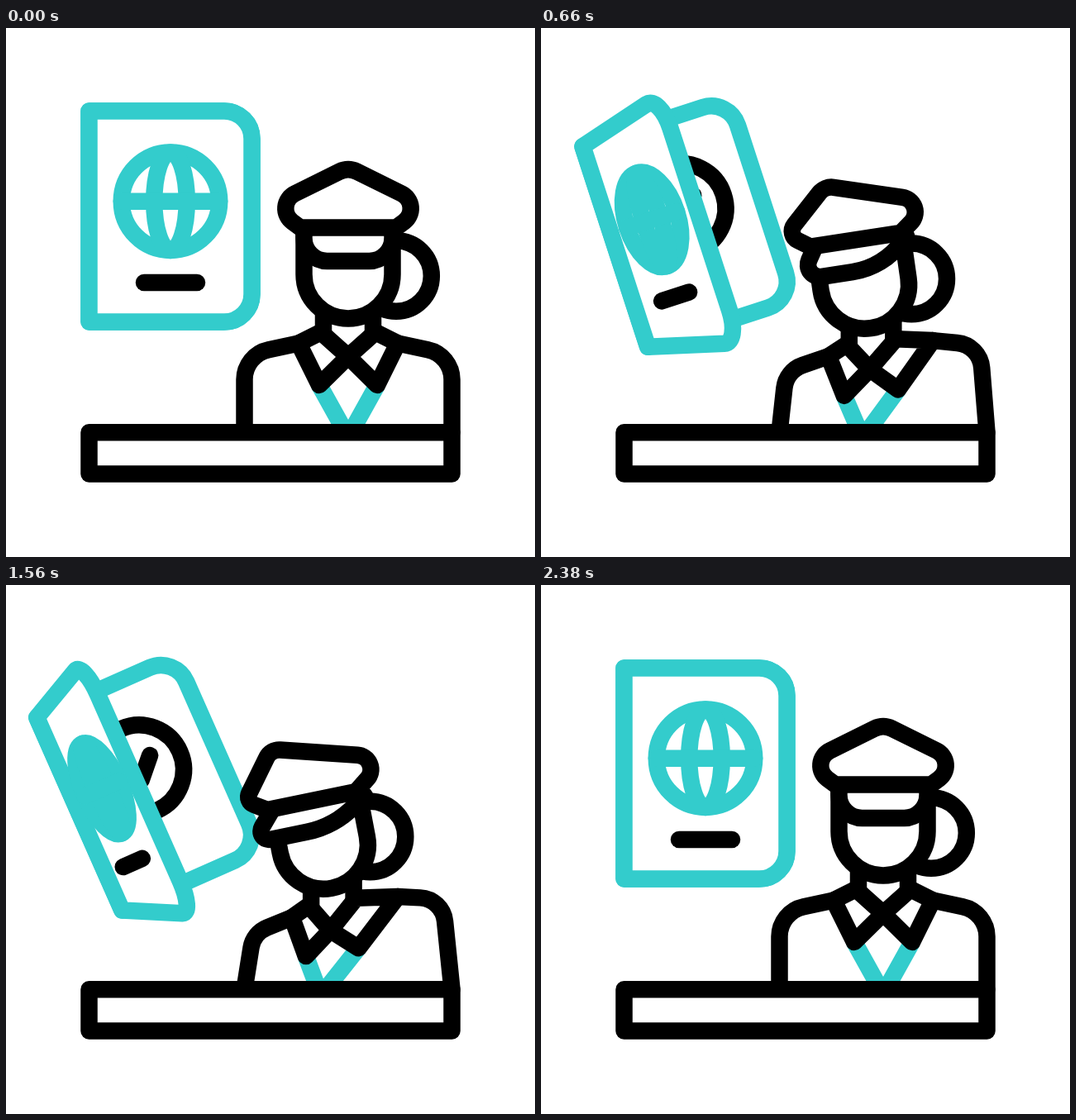
Recreate the animation shown at these times as an HTML page with a canvas. Size 640 by 640 pixels, loop 2400 ms.

```html
<!DOCTYPE html>
<html lang="en">
<head>
<meta charset="utf-8">
<title>Passport control</title>
<style>
  html, body { margin: 0; width: 100%; height: 100%; overflow: hidden; background: #fff; }
  canvas { display: block; width: 640px; height: 640px; }
</style>
</head>
<body>
<canvas id="stage" width="640" height="640"></canvas>
<script>
const ctx = document.getElementById('stage').getContext('2d');
const LOOP = 2400, TURN = 1190, BACK_END = 2386;
const TEAL = '#33cccc', BLACK = '#000', WHITE = '#fff';
const DEG = Math.PI / 180;
const AXIS = 414; // the officer is symmetric about this line at rest
const PAGE = { left: 100.5, top: 100.5, width: 197, height: 255, corner: 33.5 };

let open = 0; // 0 = closed passport, 1 = fully open
const mix = (a, b) => a + (b - a) * open;

// A key point that drifts by (dx, dy) as the passport opens.
const key = (x, y, dx = 0, dy = 0, r = 0, dr = 0) =>
  ({ x: x + dx * open, y: y + dy * open, r: r + dr * open });

// Symmetric ease with control points (0.72, 0) and (0.28, 1).
function ease(x) {
  if (x <= 0) return 0;
  if (x >= 1) return 1;
  let lo = 0, hi = 1;
  for (let i = 0; i < 24; i++) {
    const s = (lo + hi) / 2, r = 1 - s;
    if (3 * s * r * r * 0.72 + 3 * s * s * r * 0.28 + s * s * s < x) lo = s; else hi = s;
  }
  return lo * lo * (3 - 2 * lo);
}

function paint(stroke, fill) {
  if (fill) { ctx.fillStyle = fill; ctx.fill(); }
  ctx.strokeStyle = stroke;
  ctx.stroke();
}

function trace(points, closed) {
  ctx.beginPath();
  points.forEach(({ x, y, r }, i) => {
    const next = points[(i + 1) % points.length];
    if (r > 0) ctx.arcTo(x, y, next.x, next.y, r);
    else ctx.lineTo(x, y);
  });
  if (closed) ctx.closePath();
}

function line(color, ...points) {
  trace(points);
  paint(color);
}

function shape(closed, ...points) {
  trace(points, closed);
  paint(BLACK, WHITE);
}

function ellipse(x, y, rx, ry, stroke, fill) {
  ctx.beginPath();
  ctx.ellipse(x, y, rx, ry, 0, 0, Math.PI * 2);
  paint(stroke, fill);
}

function drawBackPage() {
  const { left, top, width, height, corner } = PAGE;
  ctx.beginPath();
  ctx.roundRect(left, top, width - 15.7 * open, height, [0, corner, corner, 0]);
  paint(TEAL, WHITE);

  ctx.save();
  ctx.translate(mix(198, 187), mix(210, 208));
  ellipse(0, 0, 54, 54, BLACK);
  line(BLACK, key(-15, 0), key(-3, 13), key(19, -10.5));
  ctx.restore();
}

// The cover swings on its left edge: it narrows and its free side grows taller.
function drawCover() {
  const { left, width, height, corner } = PAGE;
  const middle = PAGE.top + height / 2, half = height / 2;
  const project = (fromRight, fromEdge, side) => {
    const u = 1 - fromRight / width;
    return [left + u * mix(width, 65.5),
            middle + side * (half - fromEdge) * (1 + 0.345 * u * open)];
  };
  const handle = corner * 0.448;
  ctx.beginPath();
  ctx.moveTo(...project(width, 0, -1));
  ctx.lineTo(...project(corner, 0, -1));
  ctx.bezierCurveTo(...project(handle, 0, -1), ...project(0, handle, -1), ...project(0, corner, -1));
  ctx.lineTo(...project(0, corner, 1));
  ctx.bezierCurveTo(...project(0, handle, 1), ...project(handle, 0, 1), ...project(corner, 0, 1));
  ctx.lineTo(...project(width, 0, 1));
  ctx.closePath();
  paint(TEAL, WHITE);

  const x = mix(199, 131), y = mix(209.7, 211), rx = mix(59.2, 18.5);
  ellipse(x, y, rx, 59.2, TEAL);
  ellipse(x, y, rx / 3, 59.2, TEAL);
  line(TEAL, key(x - rx, y), key(x + rx, y));
  line(BLACK, key(167, 308, -49), key(231, 308, -92));
}

function drawPassport() {
  ctx.save();
  ctx.translate(210.5, 280);
  ctx.rotate(-26.5 * DEG * open);
  ctx.translate(-210.5, -280);
  drawBackPage();
  drawCover();
  ctx.restore();
}

// One half of the uniform; side is -1 or 1, the pairs say how each part leans.
function uniformHalf(side, shoulder, edge, neck, tip) {
  const at = (d, y, lean, r, dr) => key(AXIS + side * d, y, ...lean, r, dr);
  return {
    foot: at(125.5, 489, [0, 0]),
    shoulder: at(125.5, 395.4, shoulder, 37, -6),
    edge: at(60, 381.5, edge),
    collar: at(33, 368, neck),
    neckTop: at(30, 340, neck),
    neckEnd: at(30, 368, neck),
    tip: at(35, 432, tip)
  };
}

function drawBody() {
  const knot = key(AXIS, 397.5, -24, 22.5);
  const halves = [
    uniformHalf(-1, [12, 28.6], [-9, 23], [-16.5, 22], [-18, 19]),
    uniformHalf(1, [-12.5, -17.4], [0, -5], [-26, 12], [-25, 8])
  ];
  line(TEAL, halves[0].tip, key(AXIS, 495, -37, 2), halves[1].tip);
  for (const h of halves) {
    line(BLACK, h.foot, h.shoulder, h.edge);
    line(BLACK, h.neckTop, h.neckEnd);
  }
  for (const h of halves) shape(true, h.edge, h.collar, knot, h.tip);
}

function drawFace() {
  const r = 53.5, top = mix(-56.5, -46);
  ctx.save();
  ctx.translate(mix(AXIS, 381), mix(298, 316));
  ctx.rotate(-12 * DEG * open);
  ctx.beginPath();
  ctx.moveTo(r, top);
  ctx.arc(0, 0, r, 0, Math.PI);
  ctx.lineTo(-r, top);
  paint(BLACK, WHITE);
  ctx.restore();
}

function drawHead() {
  ellipse(mix(472, 437), mix(300, 305), 42.8, 42.8, BLACK, WHITE);
  drawFace();
  // visor
  shape(false,
    key(360.5, 241.5, -42.5, 33.5),
    key(360.5, 282, -69, 33.5, 28, -20),
    key(467.5, 282, -77.5, 11, 28, 92),
    key(467.5, 241.5, -37.5, 14.5));
  // cap
  shape(true,
    key(356, 241.5, -44, 34),
    key(320, 215, -34, 52, 20, -11),
    key(AXIS, 168.5, -104, 33.5, 24, -8),
    key(508, 215, -53, -7.5, 20, -3),
    key(472, 241.5, -54, 9.5));
}

function drawDesk() {
  ctx.beginPath();
  ctx.rect(100.5, 489.3, 439, 50.2);
  paint(BLACK, WHITE);
}

function draw(now) {
  const t = now % LOOP;
  open = ease(Math.min(t, BACK_END - t) / TURN);
  ctx.fillStyle = WHITE;
  ctx.fillRect(0, 0, 640, 640);
  ctx.lineWidth = 20.5;
  ctx.lineCap = ctx.lineJoin = 'round';
  drawPassport();
  drawBody();
  drawHead();
  drawDesk();
}

const start = performance.now();
function tick() {
  draw(performance.now() - start);
  requestAnimationFrame(tick);
}
tick();
</script>
</body>
</html>
```
